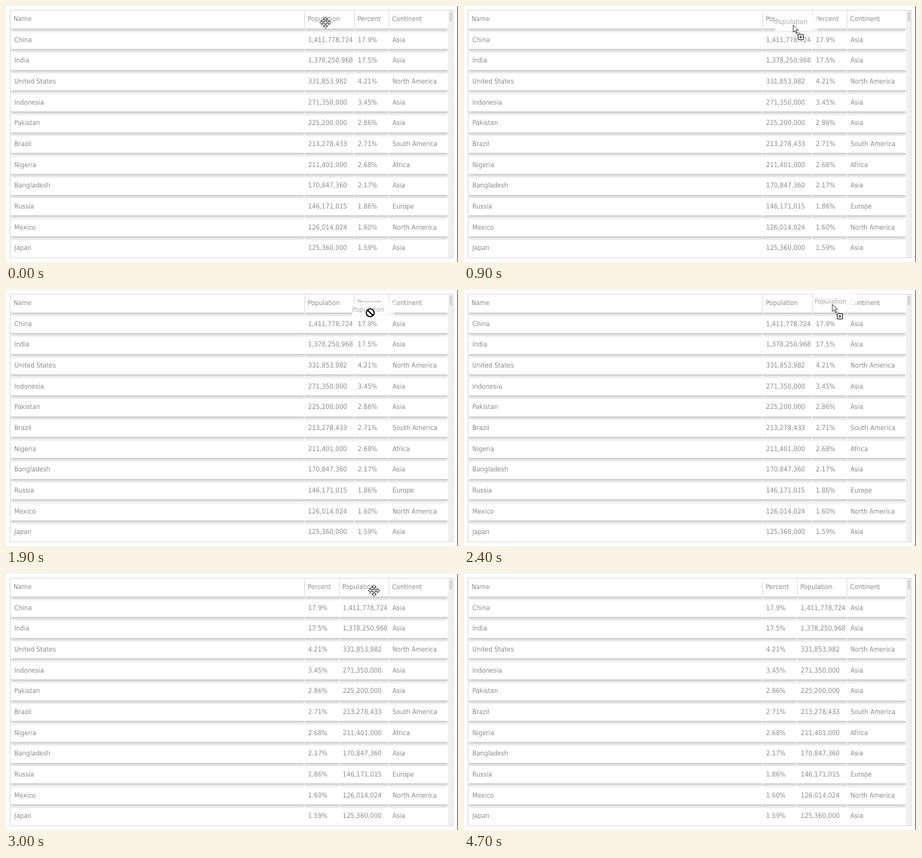
Recreate the animation shown at these times as an HTML page. Size 600x340 px, loop 4.8 s.

```html
<!DOCTYPE html>
<html lang="en">
<meta charset="utf-8">
<title>Column reordering</title>
<style>
html, body { margin: 0; width: 100%; height: 100%; overflow: hidden; background: #fff; }
body { font: 9.05px "DejaVu Sans Condensed", "Open Sans", sans-serif; color: #8c8c8c; white-space: nowrap; text-rendering: geometricPrecision; }
#grid { position: absolute; left: 5px; top: 5px; width: 587px; height: 328px; border: 1px solid #ddd; overflow: hidden; }
.row { position: absolute; left: 0; width: 581px; height: 22.4px; line-height: 23.2px; background: #fff; box-shadow: 0 2px 4px rgba(0,0,0,.27); }
.row span { position: absolute; top: 0; height: 100%; padding-left: 5px; }
.row span + span::before { content: ""; position: absolute; left: -1px; top: 100%; width: 2px; height: 5px; background: rgba(255,255,255,.35); }
.head { height: 23.5px; line-height: 24.3px; }
.head span { padding-left: 4px; }
.head span + span { border-left: 1px solid #e2e2e2; padding-left: 3.5px; }
.name { left: 0; }
.pop { left: 390px; }
.per { left: 456px; }
.cont { left: 502px; }
.swapped .per { left: 390px; }
.swapped .pop { left: 436px; }
#track { position: absolute; right: 0; top: 0; width: 6px; height: 100%; background: #f0f0f0; }
#track::before { content: ""; position: absolute; left: 2px; top: 2px; width: 3px; height: 12px; background: #d2d2d2; }
#edge { position: absolute; left: 599px; top: 0; width: 1px; height: 340px; background: #666; }
#ghost { position: absolute; left: -24px; top: -14px; width: 57px; height: 22px; line-height: 23px;
  background: linear-gradient(90deg, rgba(255,255,255,.92) 75%, rgba(255,255,255,.55)); color: #aaa; }
svg { position: absolute; left: 0; top: 0; overflow: visible; }
svg g { display: none; fill: #fff; stroke: #222; stroke-width: .9; }
</style>
<body>
<div id="grid"><div id="track"></div></div>
<div id="edge"></div>
<div id="ghost">Population</div>
<svg id="cursor" width="1" height="1">
  <defs><path id="pointer" d="M0 0V11L2.6 8.6 4.4 12.6 6 12 4.3 8H7.8Z"/></defs>
  <g id="move"><path d="M0-7.5L3-4.5H1V-1H4.5V-3L7.5 0 4.5 3V1H1V4.5H3L0 7.5-3 4.5H-1V1H-4.5V3L-7.5 0-4.5-3V-1H-1V-4.5H-3Z"/></g>
  <g id="arrow"><use href="#pointer"/></g>
  <g id="copy"><use href="#pointer" transform="scale(.87)"/><path d="M4.5 10.5H8.5V13.5H5.5Z" stroke-dasharray="1 1"/><path d="M6.5 12.5H13.5V19.5H6.5ZM8 16H12M10 14V18"/></g>
  <g id="blocked"><circle r="5.3" style="stroke:#fff;stroke-width:3"/><path d="M-3.7-3.7L3.7 3.7" style="stroke:#000;stroke-width:1.7"/><circle r="5.2" style="fill:none;stroke:#000;stroke-width:1.6"/></g>
</svg>
<script>
const $ = id => document.getElementById(id);
const fields = ["name", "pop", "per", "cont"];
const data = `Name|Population|Percent|Continent
China|1,411,778,724|17.9%|Asia
India|1,378,250,968|17.5%|Asia
United States|331,853,982|4.21%|North America
Indonesia|271,350,000|3.45%|Asia
Pakistan|225,200,000|2.86%|Asia
Brazil|213,278,433|2.71%|South America
Nigeria|211,401,000|2.68%|Africa
Bangladesh|170,847,360|2.17%|Asia
Russia|146,171,015|1.86%|Europe
Mexico|126,014,024|1.60%|North America
Japan|125,360,000|1.59%|Asia`;

data.split("\n").forEach((line, i) => {
  const row = document.createElement("div");
  row.className = i ? "row" : "row head";
  row.style.top = (i ? 28.8 + 27.65 * (i - 1) : 0) + "px";
  row.innerHTML = line.split("|").map((text, k) => `<span class="${fields[k]}">${text}</span>`).join("");
  $("grid").insertBefore(row, $("track"));
});

const LOOP = 4800, STEP = 100, GRAB = 500, DROP = 2900, LEAVE = 4000;
const HEADER_END = 28.5;

const linear = u => u;
const speedUp = u => u ** 2.5;
const glide = u => u < .5 ? 8 * u ** 4 : 1 - 8 * (1 - u) ** 4;

// The pointer starts on the header and eases from stop to stop.
const start = { x: 424, y: 22 };
const legs = [
  { from: 400, to: 1600, x: 478, y: 35.5, ease: glide },
  { from: 1600, to: 2200, x: 489, y: 25, ease: glide },
  { from: 2300, to: 2400, x: 489, y: 19, ease: linear },
  { from: 2400, to: DROP, x: 488.5, y: 22, ease: linear },
  { from: 3100, to: LEAVE, x: 556, y: 345, ease: speedUp },
];

function pointerAt(t) {
  let { x, y } = start;
  for (const leg of legs) {
    const u = leg.ease(Math.min(1, Math.max(0, (t - leg.from) / (leg.to - leg.from))));
    x += (leg.x - x) * u;
    y += (leg.y - y) * u;
  }
  return { x, y };
}

function draw() {
  const t = Math.floor(performance.now() % LOOP / STEP) * STEP;
  const { x, y } = pointerAt(t);
  const dragging = t >= GRAB && t < DROP;
  const onHeader = y < HEADER_END;
  const kind = t >= LEAVE ? "" : dragging ? (onHeader ? "copy" : "blocked") : (onHeader ? "move" : "arrow");

  document.body.className = t >= DROP ? "swapped" : "";
  $("ghost").style.display = dragging ? "block" : "none";
  for (const id of ["ghost", "cursor"]) $(id).style.transform = `translate(${x}px, ${y}px)`;
  for (const id of ["move", "arrow", "copy", "blocked"]) $(id).style.display = id === kind ? "inline" : "none";
  requestAnimationFrame(draw);
}
draw();
</script>
</body>
</html>
```
